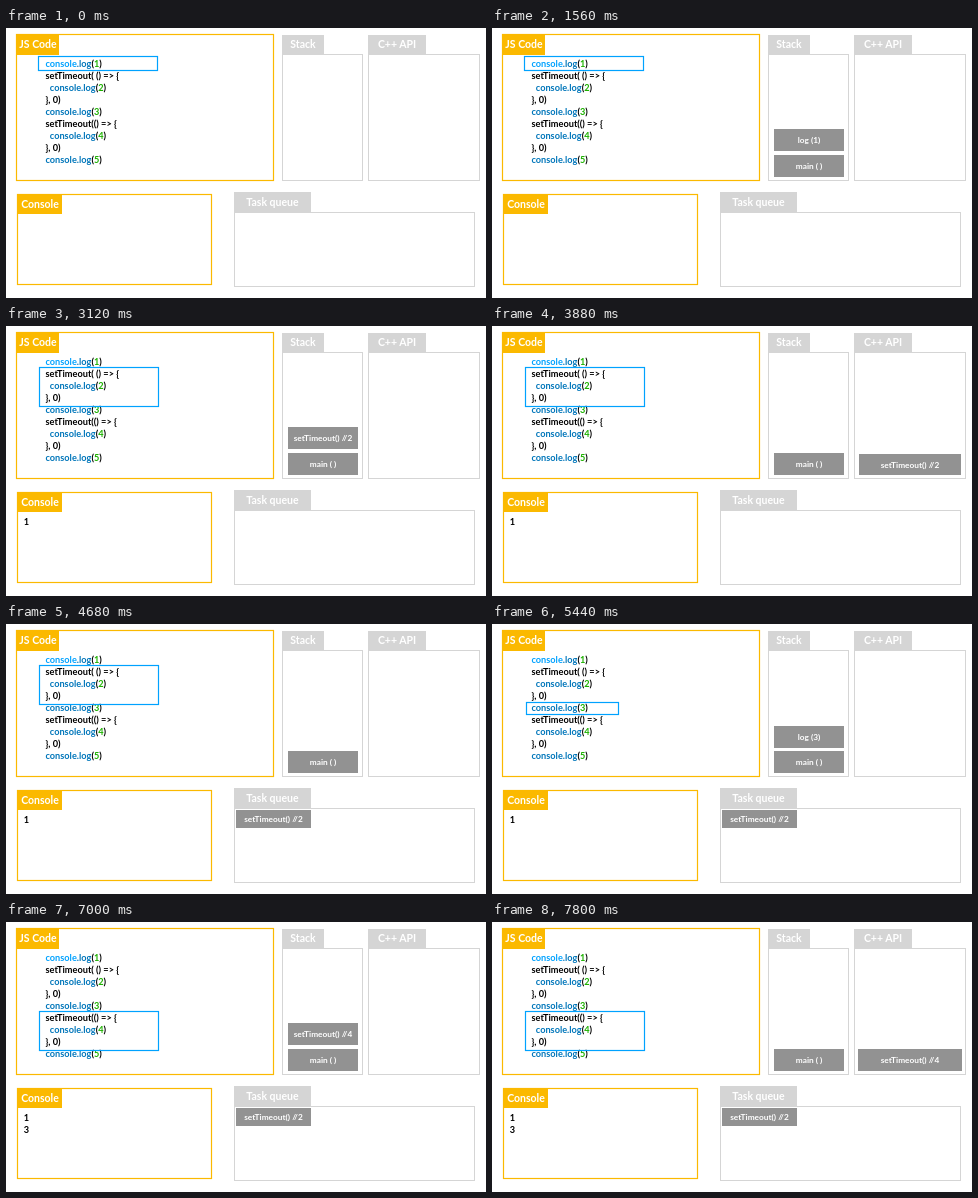
An HTML page that plays this animation: 480 by 270 pixels, repeating every 8000 ms.

```html
<!DOCTYPE html>
<html lang="en">
<head>
<meta charset="utf-8">
<title>Event loop</title>
<style>
  html, body { margin: 0; width: 100%; height: 100%; overflow: hidden; background: #fff; }
  svg { display: block; width: 100vw; height: 100vh; }
  text { font-family: Lato, "Open Sans", sans-serif; font-weight: 700; white-space: pre; }
</style>
</head>
<body>
<svg id="stage" viewBox="0 0 480 270"></svg>
<script>
const LOOP = 8000;
const YELLOW = '#fbb900', PALE = '#d5d5d5', GREY = '#929292';
const BLUE = '#0076ba', SKY = '#00a2ff', GREEN = '#1db100';
const stage = document.getElementById('stage');
const timed = [];

function add(tag, attrs, parent = stage) {
  const el = document.createElementNS('http://www.w3.org/2000/svg', tag);
  for (const key in attrs) el.setAttribute(key, attrs[key]);
  return parent.appendChild(el);
}

function text(x, y, size, fill, content, anchor = 'start', parent = stage) {
  const el = add('text', { x, y, 'font-size': size, fill, 'text-anchor': anchor }, parent);
  el.textContent = content;
  return el;
}

function fillBox(x1, y1, x2, y2, fill, parent) {
  return add('rect', { x: x1, y: y1, width: x2 - x1, height: y2 - y1, fill }, parent);
}

function frame(x1, y1, x2, y2, stroke, width = 1, parent) {
  return add('rect', {
    x: x1, y: y1, width: x2 - x1, height: y2 - y1, fill: 'none', stroke, 'stroke-width': width
  }, parent);
}

function panel(title, color, box, tab, baseline, size) {
  frame(...box, color, color === YELLOW ? 1.2 : 1);
  fillBox(...tab, color);
  text((tab[0] + tab[2]) / 2, baseline, size, '#fff', title, 'middle');
}

// Group visible from one time to another
function during(from, to) {
  const el = add('g', {});
  timed.push({ el, from, to });
  return el;
}

function call(from, to, label, x1, y1, x2, y2) {
  const g = during(from, to);
  fillBox(x1, y1, x2, y2, GREY, g);
  text((x1 + x2) / 2, (y1 + y2) / 2 + 3, 8.3, '#fff', label, 'middle', g);
}

function highlight(from, to, ...box) {
  frame(...box, SKY, 1.2, during(from, to));
}

function codeLine(row, x, parts) {
  const line = text(x, 39.4 + row * 12, 9.2, '#000', '');
  for (const [content, fill] of parts) add('tspan', { fill }, line).textContent = content;
}

function logLine(row, x, n, color = BLUE) {
  codeLine(row, x, [['console', color], ['.log', BLUE], ['(', '#000'], [n, GREEN], [')', '#000']]);
}

function plainLine(row, content) {
  codeLine(row, 39.5, [[content, '#000']]);
}

panel('JS Code', YELLOW, [10.5, 6.5, 267.5, 152.5], [11, 7, 53, 27], 20.4, 10.5);
panel('Stack', PALE, [276.5, 26.5, 356.5, 152.5], [276, 7, 318, 26], 20.4, 10.5);
panel('C++ API', PALE, [362.5, 26.5, 473.5, 152.5], [362, 7, 420, 26], 20.4, 10.5);
panel('Console', YELLOW, [11.5, 166.5, 205.5, 256.5], [12, 167, 56, 186], 180.4, 10.5);
panel('Task queue', PALE, [228.5, 184.5, 468.5, 258.5], [228, 164, 305, 184], 177.6, 10.5);

logLine(0, 39.5, 1, SKY);
plainLine(1, 'setTimeout( () => {');
logLine(2, 43.8, 2);
plainLine(3, '}, 0)');
logLine(4, 39.5, 3);
plainLine(5, 'setTimeout(() => {');
logLine(6, 43.8, 4);
plainLine(7, '}, 0)');
logLine(8, 39.5, 5);

highlight(0, 3120, 32.5, 28.5, 151.5, 42.5);
highlight(3120, 5440, 33.5, 41.5, 152.5, 80.5);
highlight(5440, 7000, 34.5, 78.5, 126.5, 90.5);
highlight(7000, LOOP, 33.5, 89.5, 152.5, 128.5);

call(800, LOOP, 'main ( )', 282, 127, 352, 149);
call(1560, 2360, 'log (1)', 282, 101, 352, 123);
call(3120, 3880, 'setTimeout() //2', 282, 101, 352, 123);
call(3880, 4680, 'setTimeout() //2', 367, 128, 469, 149);
call(4680, LOOP, 'setTimeout() //2', 230, 186, 305, 204);
call(5440, 6240, 'log (3)', 282, 102, 352, 124);
call(7000, 7800, 'setTimeout() //4', 282, 101, 352, 123);
call(7800, LOOP, 'setTimeout() //4', 366, 127, 470, 149);

text(17.7, 199, 9.2, '#000', '1', 'start', during(2360, LOOP));
text(17.7, 211, 9.2, '#000', '3', 'start', during(6240, LOOP));

function draw(t) {
  for (const { el, from, to } of timed) {
    el.setAttribute('visibility', t >= from && t < to ? 'visible' : 'hidden');
  }
}

const start = performance.now();
function tick() {
  draw((performance.now() - start) % LOOP);
  requestAnimationFrame(tick);
}
tick();
</script>
</body>
</html>
```
